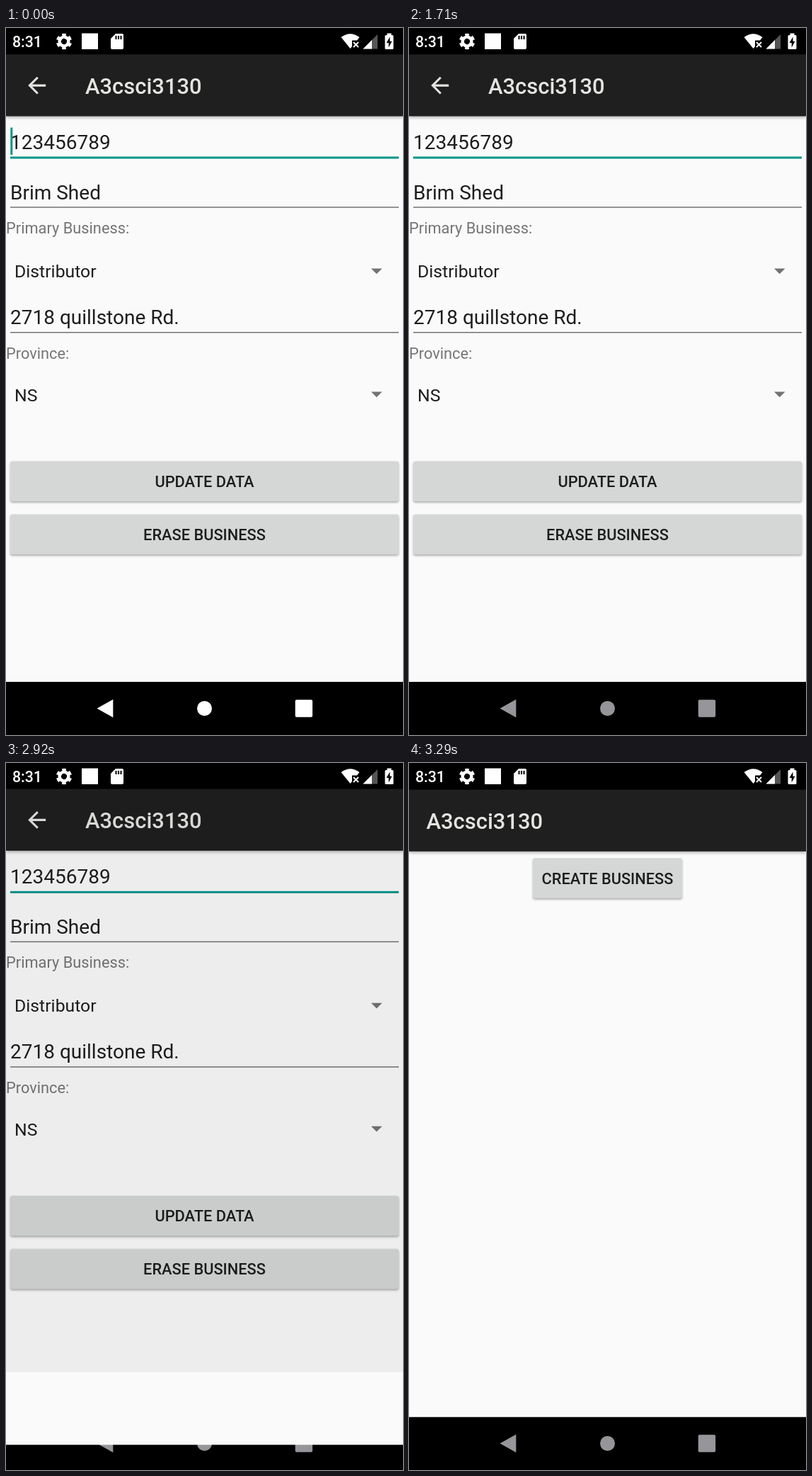
Recreate the animation shown at these times as an HTML page. Size 561x998 px, loop 7.03 s.

```html
<!DOCTYPE html>
<html lang="en">
<head>
<meta charset="utf-8">
<title>Business form</title>
<style>
  html, body { margin: 0; width: 100%; height: 100%; overflow: hidden; background: #000; }
  main { position: fixed; inset: 0; overflow: hidden; contain: strict; }
  svg { position: absolute; left: 0; top: 0; width: 561px; height: 998px; }
  text { font-family: Roboto, sans-serif; fill: #1d1d1d; }
  .title { font-size: 30.9px; font-weight: 500; fill: #e4e4e1; }
  .edit { font-size: 28px; }
  .item { font-size: 24.8px; }
  .label { font-size: 21.8px; fill: #757575; }
  .caption { font-size: 21.8px; font-weight: 500; text-anchor: middle; }
  .clock { font-size: 21.3px; font-weight: 500; fill: #fff; }
  .page { fill: #fafafa; }
  .bar { fill: #1f1f1f; filter: drop-shadow(0 2px 2px rgba(0,0,0,.3)); }
  .button { fill: #d5d7d6; filter: drop-shadow(0 2px 1.5px rgba(0,0,0,.3)); }
  .line { fill: #737370; }
  .accent { fill: #009688; }
  .caret { fill: #737373; }
  .white { fill: #fff; }

  /* One shared 7.03 s loop; percentages are moments within it. */
  .nav, .cursor, .erase, .ripple, .dim, #form, #home {
    animation: 7.03s linear infinite;
  }
  .nav { animation-name: nav-fade; }
  .cursor { animation-name: blink; animation-timing-function: step-end; }
  .erase { animation-name: lift; }
  .ripple { animation-name: ripple; }
  .dim { animation-name: dim; }
  #form { animation-name: leave; }
  #home { animation-name: appear, arrive, reveal; animation-timing-function: step-end, linear, linear; }

  @keyframes nav-fade {
    0%, .711% { fill: #fff; animation-timing-function: cubic-bezier(.333,.667,.667,1); }
    24.324%, 100% { fill: #96969a; }
  }
  @keyframes blink {
    0%, 10.669%, 32.006% { opacity: 1; }
    3.556%, 17.781%, 35.56%, 100% { opacity: 0; }
  }
  @keyframes lift {
    0%, 34.424%, 40.967%, 100% { filter: drop-shadow(0 2px 1.5px rgba(0,0,0,.3)); }
    36.13%, 38.407% { filter: drop-shadow(0 4px 3px rgba(0,0,0,.36)); }
  }
  @keyframes ripple {
    0%, 34.424%, 40.967%, 100% { opacity: 0; }
    36.13%, 38.407% { opacity: .08; }
  }
  @keyframes dim {
    0%, 40.74% { opacity: 0; }
    42.5%, 100% { opacity: .11; }
  }
  @keyframes leave {
    0%, 40.74% { transform: none; animation-timing-function: cubic-bezier(.4,0,.2,1); }
    47.568%, 100% { transform: translateY(-18px); }
  }
  @keyframes appear {
    0% { opacity: 0; }
    40.74%, 100% { opacity: 1; }
  }
  @keyframes arrive {
    0%, 40.74% { transform: translateY(41px); animation-timing-function: cubic-bezier(.4,0,.2,1); }
    47.568%, 100% { transform: none; }
  }
  @keyframes reveal {
    0%, 40.74% { clip-path: inset(957px 0 0 0); animation-timing-function: cubic-bezier(.3,0,.8,.15); }
    41.878% { clip-path: inset(574px 0 0 0); animation-timing-function: cubic-bezier(.05,.7,.1,1); }
    47.568%, 100% { clip-path: inset(0 0 0 0); }
  }
</style>
</head>
<body>
<main>

<!-- navigation bar -->
<svg viewBox="0 0 561 998">
  <g class="nav">
    <path d="M128.5 960.5L151.3 947.8V973.2Z"/>
    <circle cx="280.5" cy="960.5" r="10.5"/>
    <rect x="408.7" y="948.3" width="24.4" height="24.4" rx="2"/>
  </g>
</svg>

<!-- edit form -->
<svg id="form" viewBox="0 0 561 998">
  <rect width="561" height="60"/>
  <rect class="page" y="60" width="561" height="863"/>
  <rect class="bar" y="37.3" width="561" height="87.2"/>
  <path fill="#e4e4e1" transform="translate(25 62.4) scale(1.558)"
    d="M20 11H7.8L13.4 5.4L12 4L4 12L12 20L13.4 18.6L7.8 13H20Z"/>
  <text class="title" x="112" y="93">A3csci3130</text>

  <text class="edit" x="6" y="170.5">123456789</text>
  <rect class="accent cursor" x="6.3" y="140.5" width="3" height="38.5"/>
  <rect class="accent" x="6" y="181.5" width="549" height="3"/>

  <text class="edit" x="6" y="241.5">Brim Shed</text>
  <rect class="line" x="6" y="252.3" width="549" height="1.5"/>
  <text class="label" x="0" y="290">Primary Business:</text>
  <text class="item" x="12" y="352">Distributor</text>
  <path class="caret" d="M516 339.5H531.5L523.7 347.3Z"/>

  <text class="edit" x="6" y="418">2718 quillstone Rd.</text>
  <rect class="line" x="6" y="429" width="549" height="1.5"/>
  <text class="label" x="0" y="466.5">Province:</text>
  <text class="item" x="12" y="526.5">NS</text>
  <path class="caret" d="M516 513.5H531.5L523.7 521.3Z"/>

  <rect class="button" x="6" y="611.5" width="549" height="56.5" rx="3"/>
  <text class="caption" x="280.5" y="648">UPDATE DATA</text>
  <rect class="button erase" x="6" y="686.5" width="549" height="56.5" rx="3"/>
  <rect class="ripple" x="6" y="686.5" width="549" height="56.5" rx="3"/>
  <text class="caption" x="280.5" y="722.8">ERASE BUSINESS</text>

  <rect class="dim" width="561" height="923"/>
</svg>

<!-- home screen -->
<svg id="home" viewBox="0 0 561 998">
  <rect width="561" height="60"/>
  <rect class="page" y="60" width="561" height="863"/>
  <rect class="bar" y="37.3" width="561" height="87.2"/>
  <text class="title" x="24.5" y="93">A3csci3130</text>
  <rect class="button" x="175" y="134" width="211" height="56.5" rx="3"/>
  <text class="caption" x="280.5" y="170.5">CREATE BUSINESS</text>
</svg>

<!-- status bar -->
<svg viewBox="0 0 561 998">
  <text class="clock" x="9" y="27.3">8:31</text>
  <g fill="none" stroke="#fff" transform="rotate(30 82 19)">
    <circle cx="82" cy="19" r="6.3" stroke-width="4.6"/>
    <circle cx="82" cy="19" r="9.3" stroke-width="3.8" pathLength="12" stroke-dasharray="1.1 .9" stroke-dashoffset=".55"/>
  </g>
  <rect class="white" x="107" y="7.5" width="23" height="22.5"/>
  <path class="white" d="M155 8H164Q166 8 166 10V28Q166 30 164 30H150Q148 30 148 28V15Z"/>
  <path d="M155.5 11V16M159 11V16M162.5 11V16" stroke="#000" stroke-width="2"/>
  <path class="white" d="M473.5 13Q486.5 3.5 499.5 13L496 17.5H489V26L486.5 29Z"/>
  <path d="M491 20L498 27M498 20L491 27" stroke="#fff" stroke-width="2"/>
  <path fill="#555" d="M525 9V29.5H504.5Z"/>
  <path class="white" d="M517 17V29.5H504.5Z"/>
  <path class="white" d="M538.5 7.5H544.5V10H546Q547.5 10 547.5 11.5V28.5Q547.5 30 546 30H537Q535.5 30 535.5 28.5V11.5Q535.5 10 537 10H538.5Z"/>
  <path d="M542.5 12.5L537.5 21H540.7V27.5L545.5 18.8H542.5Z"/>
</svg>

</main>
</body>
</html>
```
